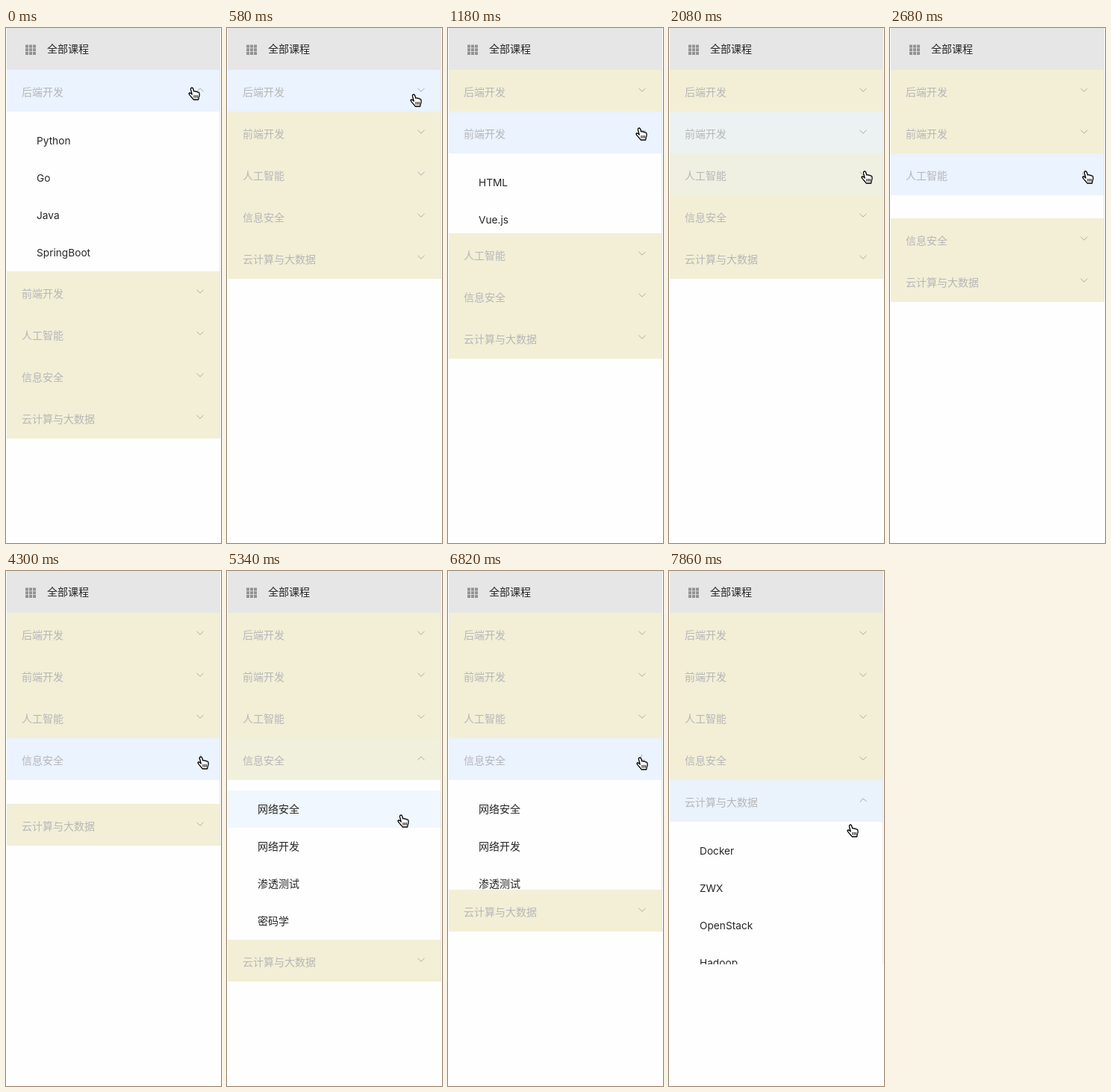
An HTML page for the animation above (8000 ms loop, 288 by 690 pixels).

```html
<!DOCTYPE html>
<html lang="zh-CN">
<head>
<meta charset="utf-8">
<title>课程菜单</title>
<style>
html, body { margin: 0; width: 100%; height: 100%; overflow: hidden; background: #fefefe; }
body { position: relative; font: 14px Inter, "Noto Sans CJK SC", "Noto Sans CJK JP", sans-serif; color: #262626; white-space: nowrap; }
#menu { position: absolute; left: 1px; top: 0; width: 286px; }
#head { height: 56px; line-height: 56px; padding-left: 54px; background: #e6e6e6; }
#list { border-right: 1px solid #e6e6e6; }
.title { position: relative; height: 56px; line-height: 59px; padding-left: 20px; color: #b6b6b8; }
.sub { overflow: hidden; }
.sub::before { content: ""; display: block; height: 14px; }
.item { height: 50px; line-height: 50px; padding-left: 40px; }
.latin { font-size: 13.7px; }
svg { position: absolute; left: 0; top: 0; overflow: visible; }
.arrow { left: 253px; top: 21px; fill: none; stroke: #a3a3a5; stroke-width: .9; }
</style>
</head>
<body>
<div id="menu">
  <div id="head">全部课程<svg width="40" height="40" fill="#929294"><path id="grid"/></svg></div>
  <div id="list"></div>
</div>
<svg id="hand" width="16" height="18" stroke="#000" stroke-width="1.3" stroke-linejoin="round" stroke-linecap="round">
  <path fill="#fff" d="M3.5 3.4Q3.2 1.6 4.5 1.1Q6 .7 6.6 2.2L7.8 6Q9.3 5.2 10.3 6.4Q11.7 5.6 12.6 7Q14.4 6.6 14.9 8.3Q15.6 11 14.3 13.6L13.7 17H7.2Q5.8 14.6 3.4 12.4Q1 9.8 1 8.8Q1.8 7.3 3.7 8.6L5.2 10Z"/>
  <path stroke-width="1" d="M8 11.3v3M10.2 11.3v3M12.3 11.3v3"/>
</svg>
<script>
const LOOP = 8000, TICK = 148.3, FADE = 300;
const TITLE = 56, GAP = 14, ITEM = 50, OPEN_HEIGHT = GAP + 4 * ITEM;
const CREAM = [242, 239, 214], BLUE = [234, 243, 254], WHITE = [254, 254, 254];

// clicks: times at which a section opens, then closes
const sections = [
  { name: '后端开发', items: ['Python', 'Go', 'Java', 'SpringBoot'], clicks: [-900, 85] },
  { name: '前端开发', items: ['HTML', 'Vue.js', 'React', 'jQuery'], clicks: [1036, 1633] },
  { name: '人工智能', items: ['机器学习', 'OpenCV', 'TensorFlow', 'PyTorch'], clicks: [2590, 3328] },
  { name: '信息安全', items: ['网络安全', '网络开发', '渗透测试', '密码学'], clicks: [4220, 6705] },
  { name: '云计算与大数据', items: ['Docker', 'ZWX', 'OpenStack', 'Hadoop'], clicks: [7628] },
];

// pointer moves: start, end, and the place reached
const moves = [
  [-400, -400, 252, 88], [350, 950, 259, 142], [1930, 2067, 265, 200],
  [3600, 3780, 264, 257], [5060, 5330, 236, 335], [5340, 5620, 230, 495],
  [5660, 5960, 248, 300], [6200, 6400, 260, 258], [7050, 7400, 262, 314], [7655, 7860, 246, 348],
];

const bezier = (x1, y1, x2, y2) => x => {
  if (x <= 0) return 0;
  if (x >= 1) return 1;
  const curve = (s, a, b) => 3 * s * (1 - s) * ((1 - s) * a + s * b) + s ** 3;
  let lo = 0, hi = 1;
  for (let i = 0; i < 20; i++) {
    const mid = (lo + hi) / 2;
    if (curve(mid, x1, x2) < x) lo = mid; else hi = mid;
  }
  return curve(lo, y1, y2);
};
const ease = bezier(.25, .1, .25, 1), easeInOut = bezier(.42, 0, .58, 1);

// 0 to 1 for a state that starts off and flips at each toggle time
const level = (toggles, t, easing) =>
  toggles.reduce((sum, at, i) => sum + (i % 2 ? -1 : 1) * easing((t - at) / FADE), 0);
const mix = (a, b, p) => `rgb(${a.map((v, i) => Math.round(v + (b[i] - v) * p))})`;
const openHeight = (section, t) => OPEN_HEIGHT * level(section.clicks, t, easeInOut);

function add(parent, className, text = '') {
  const el = document.createElement('div');
  el.className = className;
  el.textContent = text;
  return parent.appendChild(el);
}

const list = document.getElementById('list'), hand = document.getElementById('hand');
const rows = [];
function addRow(parent, className, text, base) {
  const row = { el: add(parent, className, text), base, hovers: [] };
  rows.push(row);
  return row;
}
for (const s of sections) {
  s.title = addRow(list, 'title', s.name, CREAM);
  s.title.el.insertAdjacentHTML('beforeend',
    '<svg class="arrow" width="12" height="12"><path d="M1.5 3.8L6 8.2L10.5 3.8"/></svg>');
  s.arrow = s.title.el.querySelector('svg');
  s.sub = add(list, 'sub');
  s.rows = s.items.map(name => addRow(s.sub, /^\w/.test(name) ? 'item latin' : 'item', name, WHITE));
}
let cells = '';
for (let i = 0; i < 9; i++) cells += `M${25 + i % 3 * 5} ${22.5 + Math.floor(i / 3) * 4.8}h4v3.9h-4z`;
document.getElementById('grid').setAttribute('d', cells);

function pointer(t) {
  let [, , x, y] = moves[0];
  for (const [start, end, toX, toY] of moves.slice(1)) {
    const p = Math.min(1, Math.max(0, (t - start) / (end - start)));
    x += (toX - x) * p;
    y += (toY - y) * p;
  }
  return [x, y];
}

function rowAt(y, t) {
  for (const s of sections) {
    y -= TITLE;
    if (y < TITLE) return s.title;
    const height = openHeight(s, t);
    if (y < TITLE + height) return s.rows[Math.floor((y - TITLE - GAP) / ITEM)];
    y -= height;
  }
}

// find when the fingertip enters and leaves each row
let hovered;
for (let t = -400; t < LOOP; t += 5) {
  const row = rowAt(pointer(t)[1] - 8, t);
  if (row === hovered) continue;
  hovered?.hovers.push(t);
  row?.hovers.push(t);
  hovered = row;
}

function render(t) {
  for (const s of sections) {
    s.sub.style.height = openHeight(s, t) + 'px';
    s.arrow.style.transform = `rotate(${level(s.clicks, t, ease) * 180}deg)`;
  }
  for (const { el, base, hovers } of rows) el.style.background = mix(base, BLUE, level(hovers, t, ease));
  const [x, y] = pointer(t);
  hand.style.transform = `translate(${Math.round(x) - 8}px, ${Math.round(y) - 9}px)`;
}

// the picture advances in held steps
function frame() {
  const t = performance.now() % LOOP;
  render(Math.min(53, Math.floor((t + 7) / TICK)) * TICK);
  requestAnimationFrame(frame);
}
frame();
</script>
</body>
</html>
```
